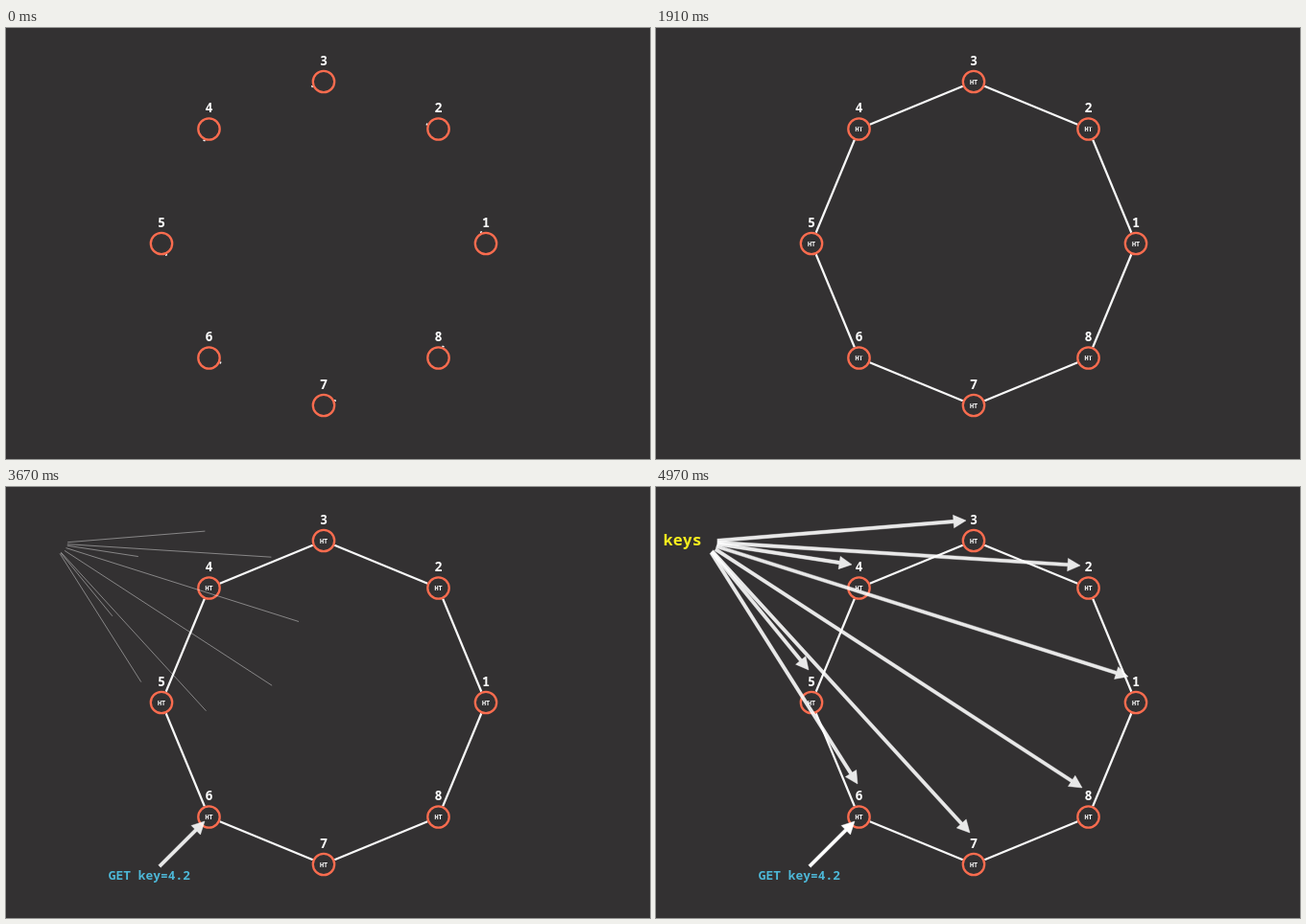
Animation, 671 px wide and 450 px high, one loop 5 s. Source, as an HTML page with a canvas:

```html
<!DOCTYPE html>
<html lang="en">
<head>
<meta charset="utf-8">
<title>Hash ring</title>
<style>
  html, body { margin: 0; width: 100%; height: 100%; overflow: hidden; background: #333132; }
  canvas { display: block; width: 671px; height: 450px; }
</style>
</head>
<body>
<canvas id="stage" width="671" height="450"></canvas>
<script>
const ctx = document.getElementById('stage').getContext('2d');
const LOOP = 5000;
const MONO = '"Noto Sans Mono", "DejaVu Sans Mono", monospace';
const CENTER = { x: 331, y: 225 }, RING = 169, NODE = 11.2;

// start and duration in ms
const PHASE = {
  edges: [0, 1015],
  tables: [1000, 970],
  getArrow: [1970, 2000],
  getText: [2500, 520],
  keyArrows: [3270, 2000],
  keyText: [3820, 520],
};

const nodes = Array.from({ length: 8 }, (_, i) => ({
  x: CENTER.x + RING * Math.cos(i * Math.PI / 4),
  y: CENTER.y - RING * Math.sin(i * Math.PI / 4),
}));

const getArrow = [160, 396, 207, 349];
const keyArrows = [
  [63, 62, 492, 198], [64, 58, 442, 82], [64, 56, 323, 35], [64, 59.5, 204, 81],
  [58.5, 68, 159, 191], [57.5, 68.5, 210, 310], [58.5, 67, 327, 361], [62, 65, 444, 314],
];

const clamp = v => Math.min(1, Math.max(0, v));
const sigmoid = v => 1 / (1 + Math.exp(-v));
const smooth = t => {
  const edge = sigmoid(-5);
  return clamp((sigmoid(10 * (t - 0.5)) - edge) / (1 - 2 * edge));
};
const progress = (time, [start, length]) => clamp((time - start) / length);

function drawEdge(a, b, amount) {
  const dx = b.x - a.x, dy = b.y - a.y, dist = Math.hypot(dx, dy);
  const gap = 12.2, length = Math.max(1.5, (dist - 2 * gap) * amount);
  const at = d => [a.x + dx * d / dist, a.y + dy * d / dist];
  ctx.beginPath();
  ctx.moveTo(...at(gap));
  ctx.lineTo(...at(gap + length));
  ctx.strokeStyle = '#f8f8f8';
  ctx.lineWidth = 2.2;
  ctx.stroke();
}

function drawNode({ x, y }, label) {
  ctx.beginPath();
  ctx.arc(x, y, NODE, 0, 2 * Math.PI);
  ctx.strokeStyle = '#f96c4f';
  ctx.lineWidth = 2.3;
  ctx.stroke();
  ctx.font = `700 13.5px ${MONO}`;
  ctx.fillStyle = '#fff';
  ctx.textAlign = 'center';
  ctx.fillText(label, x, y - 17.2);
}

// Letters appear one after another, each growing from its foot.
function writeText(text, x, baseline, size, weight, color, amount) {
  if (amount <= 0) return;
  ctx.font = `${weight} ${size}px ${MONO}`;
  ctx.fillStyle = color;
  ctx.textAlign = 'left';
  if (amount >= 1) {
    ctx.fillText(text, x, baseline);
    return;
  }
  const advance = ctx.measureText('0').width;
  const count = text.replace(/ /g, '').length;
  let order = 0;
  [...text].forEach((char, i) => {
    if (char === ' ') return;
    const shown = clamp(amount * count - order++);
    if (!shown) return;
    const left = x + i * advance;
    const foot = /[gy]/.test(char) ? baseline + size * 0.25 : baseline;
    const height = shown < 1 ? (foot - baseline + size * 0.76) * shown : size * 1.3;
    ctx.save();
    ctx.beginPath();
    ctx.rect(left - 1, foot + 0.5 - height, advance + 2, height);
    ctx.clip();
    ctx.fillText(char, left, baseline);
    ctx.restore();
  });
}

function arrowOutline([x1, y1, x2, y2]) {
  const length = Math.hypot(x2 - x1, y2 - y1);
  const ux = (x2 - x1) / length, uy = (y2 - y1) / length;
  const point = (along, side) => [x1 + ux * along - uy * side, y1 + uy * along + ux * side];
  const neck = length - 13, shaft = 1.7, barb = 6.7;
  return [
    point(0, shaft), point(neck, shaft), point(neck, barb), point(length, 0),
    point(neck, -barb), point(neck, -shaft), point(0, -shaft), point(0, shaft),
  ];
}

// The border is traced in the first half, the body fades in during the second.
function drawArrow(arrow, t) {
  if (t <= 0) return;
  const trace = smooth(clamp(t * 2)), fill = smooth(clamp(t * 2 - 1));
  const weights = [0.46, 0.015, 0.02, 0.02, 0.015, 0.46, 0.01];
  const points = arrowOutline(arrow);
  let left = t >= 0.5 ? 1.01 : trace;
  ctx.beginPath();
  ctx.moveTo(...points[0]);
  weights.forEach((weight, i) => {
    if (left <= 0) return;
    const part = Math.min(1, left / weight);
    const [ax, ay] = points[i], [bx, by] = points[i + 1];
    ctx.lineTo(ax + (bx - ax) * part, ay + (by - ay) * part);
    left -= weight;
  });
  if (t >= 0.5) {
    ctx.fillStyle = `rgba(255,255,255,${fill})`;
    ctx.fill();
  }
  ctx.strokeStyle = 'rgba(255,255,255,0.55)';
  ctx.lineWidth = 0.75;
  ctx.stroke();
}

function draw(time) {
  ctx.fillStyle = '#333132';
  ctx.fillRect(0, 0, 671, 450);

  const edge = smooth(progress(time, PHASE.edges));
  const table = smooth(progress(time, PHASE.tables));
  nodes.forEach((node, i) => drawEdge(node, nodes[(i + 1) % 8], edge));
  nodes.forEach((node, i) => {
    drawNode(node, i + 1);
    writeText('HT', node.x - 4.1, node.y + 2.6, 6.8, 700, '#fff', table);
  });

  drawArrow(getArrow, progress(time, PHASE.getArrow));
  writeText('GET key=4.2', 106.8, 410, 12.9, 600, '#4db8d8',
    smooth(progress(time, PHASE.getText)));

  const keyTime = progress(time, PHASE.keyArrows);
  keyArrows.forEach(arrow => drawArrow(arrow, keyTime));
  writeText('keys', 7.8, 61, 16.6, 600, '#faf01e', smooth(progress(time, PHASE.keyText)));
}

const begin = performance.now();
function tick() {
  draw((performance.now() - begin) % LOOP);
  requestAnimationFrame(tick);
}
tick();
</script>
</body>
</html>
```
